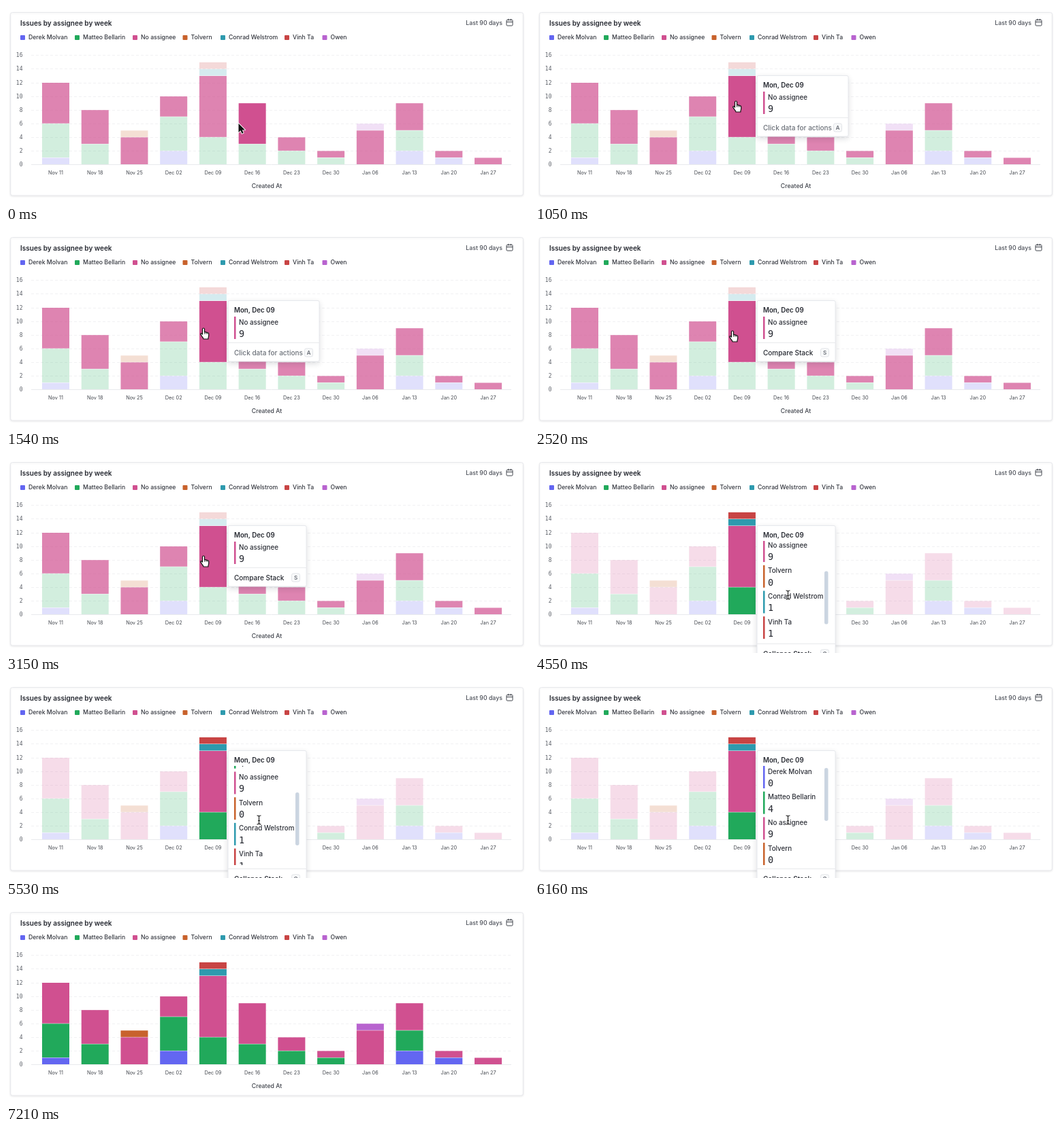
An HTML page with a canvas for the animation above (7.28 s loop, 768 by 290 pixels).

```html
<!DOCTYPE html>
<html lang="en">
<head>
<meta charset="utf-8">
<title>Issues by assignee</title>
<style>
  html, body { margin: 0; width: 100%; height: 100%; overflow: hidden; background: #fff; }
  canvas { display: block; width: 768px; height: 290px; }
</style>
</head>
<body>
<canvas id="stage"></canvas>
<script>
const W = 768, H = 290, LOOP = 7280, STEP = 70;
const canvas = document.getElementById('stage');
const ctx = canvas.getContext('2d');
const dpr = window.devicePixelRatio || 1;
canvas.width = W * dpr;
canvas.height = H * dpr;

const SANS = 'Inter, "Liberation Sans", sans-serif';
const MONO = '"DejaVu Sans Mono", "Noto Sans Mono", monospace';
const INK = '#24272f', MUTED = '#6b7078';

const series = [
  { name: 'Derek Molvan', color: '#6366f1', x: 21 },
  { name: 'Matteo Bellarin', color: '#21a95b', x: 101 },
  { name: 'No assignee', color: '#d05090', x: 186 },
  { name: 'Tolvern', color: '#c8622c', x: 259.5 },
  { name: 'Conrad Welstrom', color: '#2e9aae', x: 315 },
  { name: 'Vinh Ta', color: '#c84444', x: 409 },
  { name: 'Owen', color: '#b863cf', x: 464.5 }
];

// Each week lists its counts in series order
const weeks = [
  ['Nov 11', 1, 5, 6], ['Nov 18', 0, 3, 5], ['Nov 25', 0, 0, 4, 1],
  ['Dec 02', 2, 5, 3], ['Dec 09', 0, 4, 9, 0, 1, 1], ['Dec 16', 0, 3, 6],
  ['Dec 23', 0, 2, 2], ['Dec 30', 0, 1, 1], ['Jan 06', 0, 0, 5, 0, 0, 0, 1],
  ['Jan 13', 2, 3, 4], ['Jan 20', 1, 0, 1], ['Jan 27', 0, 0, 1]
];
const DEC09 = 4, DEC16 = 5, NOBODY = 2;

const BASE = 233, UNIT = 10.04, BAR_X = 53, BAR_W = 40, PITCH = 57.73;
const ROW = 37.7, LIST_TOP = 125, LIST_H = 146, MAX_SCROLL = 120;

// Moments of the interaction, in ms
const ENTER = 210, MENU = 2170, EXPAND = 3710, COLLAPSE = 7000;

const pointerPath = [
  [70, 341.5, 173], [420, 291, 151], [630, 291, 151], [1050, 295, 140],
  [1540, 290, 143], [1750, 290, 147], [3290, 290, 147], [3640, 372, 180],
  [3780, 372, 180], [4060, 371.5, 204.5], [6510, 371.5, 204.5], [6860, 371.5, 306]
];
const scrollPath = [[4060, 0], [4880, MAX_SCROLL], [5110, MAX_SCROLL], [6020, 0]];

const clamp = v => Math.max(0, Math.min(1, v));
const ease = v => v * v * (3 - 2 * v);

function follow(path, t) {
  if (t <= path[0][0]) return path[0].slice(1);
  for (let i = 1; i < path.length; i++) {
    const a = path[i - 1], b = path[i];
    if (t < b[0]) {
      const k = ease((t - a[0]) / (b[0] - a[0]));
      return a.slice(1).map((v, j) => v + (b[j + 1] - v) * k);
    }
  }
  return path[path.length - 1].slice(1);
}

function text(str, x, y, size, color = INK, weight = 500, align = 'left', family = SANS) {
  ctx.font = `${weight} ${size}px ${family}`;
  ctx.fillStyle = color;
  ctx.textAlign = align;
  ctx.fillText(str, x, y);
}

function rect(x, y, w, h, color) {
  ctx.fillStyle = color;
  ctx.fillRect(x, y, w, h);
}

function panel(x, y, w, h, r, fill, stroke) {
  ctx.beginPath();
  ctx.roundRect(x, y, w, h, r);
  if (fill) { ctx.fillStyle = fill; ctx.fill(); }
  if (stroke) { ctx.strokeStyle = stroke; ctx.lineWidth = 1; ctx.stroke(); }
}

function line(x1, y1, x2, y2, color, width = 1) {
  ctx.strokeStyle = color;
  ctx.lineWidth = width;
  ctx.beginPath();
  ctx.moveTo(x1, y1);
  ctx.lineTo(x2, y2);
  ctx.stroke();
}

function shadow(color, blur, dy) {
  ctx.shadowColor = color;
  ctx.shadowBlur = blur * dpr;
  ctx.shadowOffsetY = dy * dpr;
}

function drawCard() {
  rect(0, 0, W, H, '#fff');
  ctx.save();
  shadow('rgba(20,25,40,.08)', 3, 1);
  panel(6.5, 9.5, 753, 269.5, 3, '#fff', '#e7e8ec');
  ctx.restore();

  text('Issues by assignee by week', 21, 29, 10, INK, 600);
  text('Last 90 days', 729, 27.5, 8.8, '#4a4e57', 500, 'right');
  panel(735, 20.5, 9, 8.5, 1.2, null, '#3f434b');
  line(735, 23.5, 744, 23.5, '#3f434b');
  line(737.5, 18.8, 737.5, 21.5, '#3f434b');
  line(741.5, 18.8, 741.5, 21.5, '#3f434b');

  for (const s of series) {
    panel(s.x, 43, 7, 7, 1, s.color);
    text(s.name, s.x + 12, 49.4, 8.7, '#33363e');
  }
}

function drawAxes() {
  for (let v = 0; v <= 16; v += 2) {
    const y = Math.round(BASE - v * UNIT) + 0.5;
    ctx.setLineDash(v ? [4, 3] : []);
    line(37, y, 742, y, v ? '#f1f1f3' : '#e9eaed');
    text(v, 24.5, y + 2, 8, '#5d6169', 400, 'right', MONO);
  }
  ctx.setLineDash([]);
  weeks.forEach((w, i) =>
    text(w[0], BAR_X + BAR_W / 2 + i * PITCH, 247.6, 7.3, '#44484f', 400, 'center'));
  text('Created At', 383, 267.5, 8.7, '#3f434b', 500, 'center');
}

function opacity(week, s, mode, hover) {
  if (mode === 'idle') return 1;
  if (mode === 'stack') return week === DEC09 ? 1 : 0.2;
  if (s !== NOBODY) return 0.2;
  return week === hover ? 1 : 0.7;
}

function drawBars(mode, hover) {
  weeks.forEach(([, ...counts], i) => {
    let y = BASE;
    counts.forEach((n, s) => {
      if (!n) return;
      const h = n * UNIT;
      ctx.globalAlpha = opacity(i, s, mode, hover);
      rect(BAR_X + i * PITCH, y - h + 0.5, BAR_W, h - 0.5, series[s].color);
      y -= h;
    });
  });
  ctx.globalAlpha = 1;
}

function drawEntry(s, count, y) {
  rect(335, y, 2.5, 33, series[s].color);
  text(series[s].name, 342, y + 11.5, 9.8, '#2c2f37');
  text(count, 342, y + 30, 13.5, INK, 400, 'left', MONO);
}

function drawTooltip(stage, scroll, alpha) {
  const stack = stage === 'stack', hint = stage === 'hint';
  const width = hint ? 134 : 115;
  const split = stack ? 276 : 164;
  ctx.save();
  ctx.globalAlpha = alpha;
  ctx.save();
  shadow('rgba(20,25,40,.16)', 9, 3);
  panel(326, 102.5, width, split - 74.5, 2, '#fff');
  ctx.restore();
  panel(326, 102.5, width, split - 74.5, 2, null, '#e6e8ec');
  text('Mon, Dec 09', 335, 119.5, 9.7, INK, 600);

  if (stack) {
    ctx.save();
    ctx.beginPath();
    ctx.rect(326, LIST_TOP, width, LIST_H);
    ctx.clip();
    series.forEach((_, s) =>
      drawEntry(s, weeks[DEC09][s + 1] || 0, LIST_TOP + s * ROW - scroll));
    ctx.restore();
    panel(425, 128 + scroll * 0.538, 5.5, 78, 2.7, '#cbd5e1');
  } else {
    drawEntry(NOBODY, 9, 126);
  }

  line(326, split + 0.5, 326 + width, split + 0.5, '#e8e9ec');
  const label = hint ? 'Click data for actions' : stack ? 'Collapse Stack' : 'Compare Stack';
  text(label, 335, split + 19, 10, hint ? MUTED : INK);
  const keyX = 326 + width - 22;
  panel(keyX + 0.5, split + 9, 12, 12, 2.5, '#f8f9fa', '#e2e4e8');
  text(hint ? 'A' : stack ? 'C' : 'S', keyX + 6.5, split + 18, 8, '#555a63', 500, 'center');
  ctx.restore();
}

const ARROW = new Path2D('M0 0V13L3 10.2 5 14.8 7.2 13.8 5.2 9.4H9.4z');
const HAND = new Path2D('M0 0c1 0 1.5.7 1.5 1.6V6c.4-.5 1.8-.5 2.2.3.6-.4 1.7-.2 2 .6' +
  '.8-.3 2 .1 2 1.3v3c0 1.6-.8 2.2-.8 3.8V16H0c0-1.4-1-2-1.8-3.2L-4.2 9.2' +
  'c-.6-1 .6-2 1.6-1.2L-1.5 9.2V1.6C-1.5.7-1 0 0 0z');
const BEAM = new Path2D('M-3-6.5Q0-6.5 0-4.5Q0-6.5 3-6.5M0-4.5V4.5M-3 6.5Q0 6.5 0 4.5Q0 6.5 3 6.5M-1.5 1H1.5');

function drawPointer(kind, x, y) {
  ctx.save();
  ctx.translate(x, y);
  ctx.lineJoin = 'round';
  if (kind === 'arrow') {
    ctx.strokeStyle = '#fff';
    ctx.lineWidth = 1.8;
    ctx.stroke(ARROW);
    ctx.fillStyle = '#111';
    ctx.fill(ARROW);
  } else if (kind === 'hand') {
    ctx.fillStyle = '#fff';
    ctx.fill(HAND);
    ctx.strokeStyle = '#111';
    ctx.lineWidth = 1.2;
    ctx.stroke(HAND);
    for (const fx of [1.5, 3.7, 5.7]) line(fx, 6, fx, 8.8, '#111', 0.8);
  } else {
    ctx.strokeStyle = '#fff';
    ctx.lineWidth = 2.6;
    ctx.stroke(BEAM);
    ctx.strokeStyle = '#222';
    ctx.lineWidth = 1.2;
    ctx.stroke(BEAM);
  }
  ctx.restore();
}

function pointerKind(t) {
  if (t < ENTER) return 'arrow';
  return t < 3850 ? 'hand' : 'beam';
}

function draw(t) {
  const [px, py] = follow(pointerPath, t);
  const [scroll] = follow(scrollPath, t);
  const mode = t >= COLLAPSE ? 'idle' : t >= EXPAND ? 'stack' : 'hover';

  ctx.setTransform(dpr, 0, 0, dpr, 0, 0);
  drawCard();
  drawAxes();
  drawBars(mode, t < ENTER ? DEC16 : DEC09);
  if (t >= ENTER && mode !== 'idle') {
    const stage = mode === 'stack' ? 'stack' : t < MENU ? 'hint' : 'menu';
    drawTooltip(stage, scroll, clamp((t - ENTER + STEP) / 210));
  }
  drawPointer(pointerKind(t), px, py);
}

const start = performance.now();
function tick() {
  const t = Math.max(0, performance.now() - start) % LOOP;
  draw(Math.floor(t / STEP) * STEP);
  requestAnimationFrame(tick);
}
tick();
</script>
</body>
</html>
```
